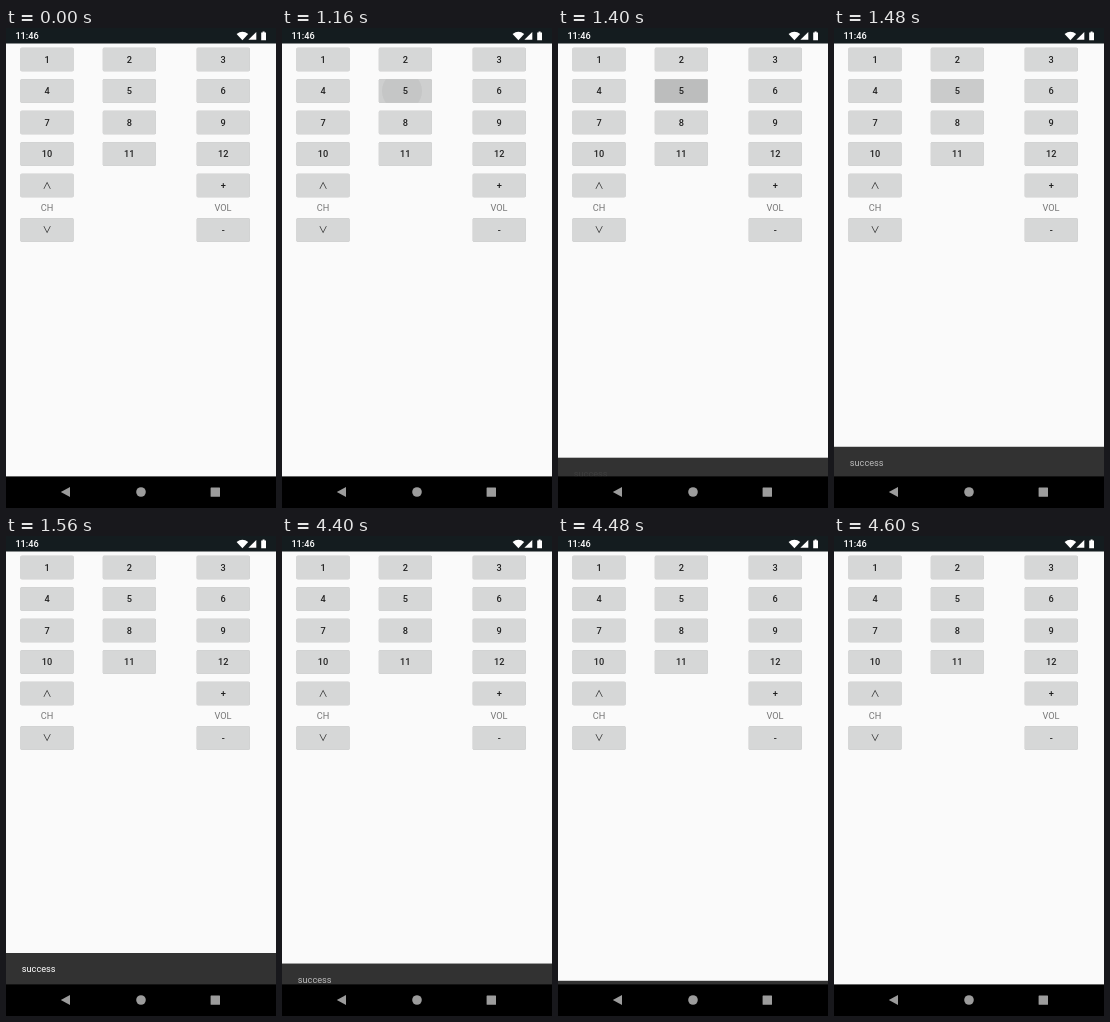
These frames come from a looping animation (270 px wide and 480 px high, 4.96 s). An HTML page:

```html
<!DOCTYPE html>
<html lang="en">
<head>
<meta charset="utf-8">
<title>Remote control</title>
<style>
  html, body { margin: 0; width: 100%; height: 100%; overflow: hidden; background: #fafafa; }
  svg { display: block; width: 100vw; height: 100vh; }
  text { font: 9.2px Roboto, sans-serif; }
  .key { fill: #d6d7d7; filter: drop-shadow(0 .7px .7px rgba(0, 0, 0, .28)); }
  .caption { font-weight: 500; fill: #212121; text-anchor: middle; }
  .arrow { font-family: "Noto Sans CJK JP", "Noto Sans CJK", sans-serif; font-weight: 400; }
  .label { fill: #757575; text-anchor: middle; }
  .clock { font-weight: 500; fill: #fff; }
</style>
</head>
<body>
<svg viewBox="0 0 270 480">
  <defs>
    <clipPath id="keyClip"><rect x="96.8" y="51.2" width="53" height="23.6" rx="1.3"/></clipPath>
  </defs>
  <rect width="270" height="480" fill="#fafafa"/>

  <g id="keys"></g>
  <g clip-path="url(#keyClip)">
    <rect id="press" x="96" y="51" width="55" height="25" opacity="0"/>
    <circle id="ripple" cy="63" opacity="0"/>
  </g>
  <g id="captions"></g>
  <text class="label" x="41" y="183.3">CH</text>
  <text class="label" x="217" y="183.3">VOL</text>

  <g id="snackbar" visibility="hidden">
    <rect y="417" width="270" height="32" fill="#323232"/>
    <text id="message" x="15.8" y="436.4" fill="#fff">success</text>
  </g>

  <rect width="270" height="15.5" fill="#141c1f"/>
  <text class="clock" x="9.4" y="11.3">11:46</text>
  <g fill="#fff">
    <path d="M230.6 5.9Q236.4 1.6 242.2 5.9L236.4 12.2Z"/>
    <path d="M250.3 3.9V11.8H242.4Z"/>
    <path d="M255.2 4.4H256.6V3.4H258.6V4.4H260V12.2H255.2Z"/>
  </g>

  <rect y="448.4" width="270" height="32"/>
  <g fill="#9c9c9c">
    <path d="M54.8 464L64 458.9V469.1Z"/>
    <circle cx="135" cy="464" r="4.8"/>
    <rect x="204.6" y="459.4" width="9.4" height="9.4" rx=".5"/>
  </g>
</svg>
<script>
  const LOOP = 4960, STEP = 40, BAR = 31.5;
  const byId = id => document.getElementById(id);
  const clamp = v => Math.min(1, Math.max(0, v));
  const progress = (t, start, length) => clamp((t - start) / length);
  const smooth = p => (1 - Math.cos(Math.PI * p)) / 2;

  // cubic-bezier(.4, 0, .2, 1)
  function fastOutSlowIn(x) {
    let low = 0, high = 1;
    for (let i = 0; i < 24; i++) {
      const u = (low + high) / 2, v = 1 - u;
      if (1.2 * v * v * u + 0.6 * v * u * u + u ** 3 < x) low = u; else high = u;
    }
    return low * low * (3 - 2 * low);
  }

  function add(parent, tag, attrs, text = '') {
    const node = document.createElementNS('http://www.w3.org/2000/svg', tag);
    for (const name in attrs) node.setAttribute(name, attrs[name]);
    node.textContent = text;
    byId(parent).append(node);
  }

  function addKey(caption, x, y) {
    const arrow = '∧∨'.includes(caption) ? ' arrow' : '';
    add('keys', 'rect', { class: 'key', x: x - 26.5, y: y - 11.8, width: 53, height: 23.6, rx: 1.3 });
    add('captions', 'text', { class: 'caption' + arrow, x, y: y + 3.3 }, caption);
  }

  const columns = [41, 123.3, 217.2];
  for (let i = 0; i < 12; i++) {
    addKey(String(i + 1), columns[i % 3], 31.5 + BAR * Math.floor(i / 3));
  }
  addKey('∧', columns[0], 157.5);
  addKey('+', columns[2], 157.5);
  addKey('∨', columns[0], 202);
  addKey('-', columns[2], 202);

  function set(id, attrs) {
    for (const name in attrs) byId(id).setAttribute(name, attrs[name]);
  }

  function draw(t) {
    const touched = t >= 1160 && t < 1560;
    const strength = touched ? progress(t, 1110, 75) * (1 - progress(t, 1400, 140)) : 0;
    const spread = progress(t, 1080, 160);
    set('press', { opacity: 0.06 * strength });
    set('ripple', { cx: 117 + 6 * spread, r: 10 + 20 * spread, opacity: 0.065 * strength });

    const leaving = t >= 4400;
    const shown = leaving
      ? 1 - fastOutSlowIn(progress(t, 4328, 250))
      : fastOutSlowIn(progress(t, 1302, 250));
    const alpha = leaving
      ? 1 - smooth(progress(t, 4328, 180))
      : smooth(progress(t, 1372, 180));
    set('snackbar', {
      transform: `translate(0 ${BAR * (1 - shown)})`,
      visibility: shown > 0.001 ? 'visible' : 'hidden'
    });
    set('message', { opacity: alpha });
  }

  const start = performance.now();
  function tick() {
    const t = (performance.now() - start) % LOOP;
    draw(Math.floor(t / STEP) * STEP);
    requestAnimationFrame(tick);
  }
  tick();
</script>
</body>
</html>
```
